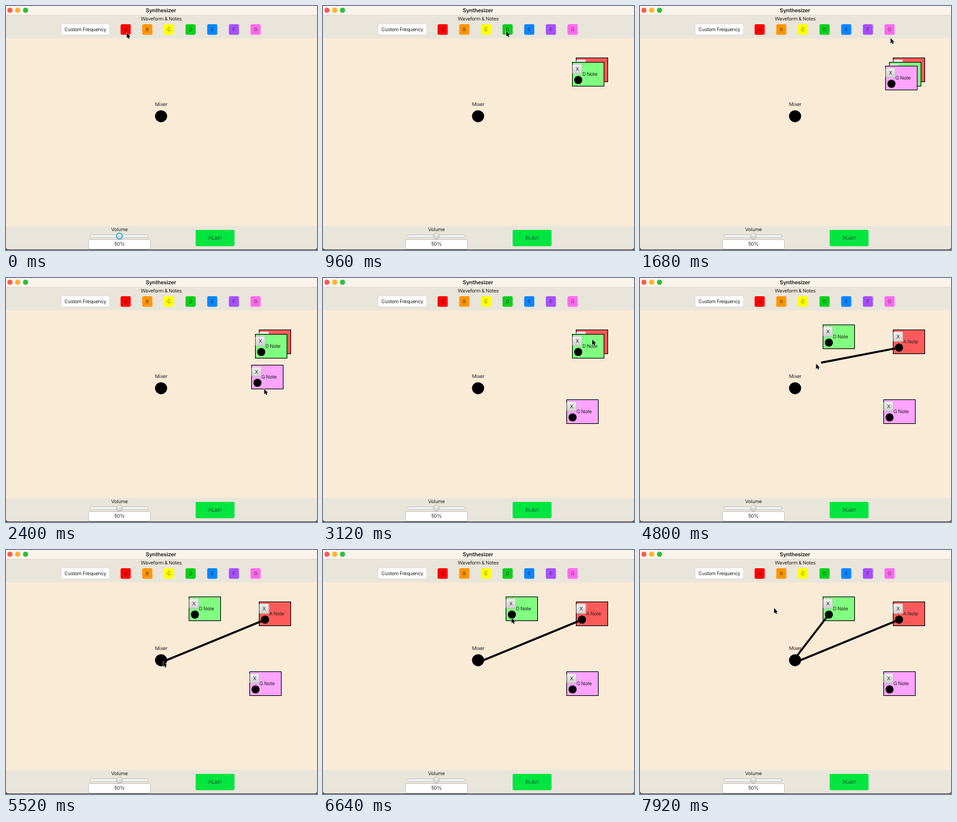
An HTML page for the animation above (8000 ms loop, 492 by 388 pixels).

```html
<!DOCTYPE html>
<html lang="en">
<head>
<meta charset="utf-8">
<title>Synthesizer</title>
<style>
  html, body { margin: 0; width: 100%; height: 100%; overflow: hidden; background: #faebd7; }
  svg { display: block; width: 100%; height: 100%; }
  text {
    font: 7.8px Inter, "Open Sans", sans-serif; letter-spacing: -.2px; word-spacing: -.4px;
    text-anchor: middle; fill: #222; text-rendering: geometricPrecision;
  }
  .title { font-weight: 700; font-size: 8.7px; letter-spacing: -.25px; fill: #35322f; }
</style>
</head>
<body>
<svg viewBox="0 0 492 388" xmlns="http://www.w3.org/2000/svg">
  <defs>
    <linearGradient id="grey" x2="0" y2="1">
      <stop offset="0" stop-color="#f1f1f1"/><stop offset="1" stop-color="#cfcfcf"/>
    </linearGradient>
  </defs>
  <rect width="492" height="388" fill="#faebd7"/>
  <rect width="492" height="15" fill="#faf4ec"/>
  <rect y="15" width="492" height="36.5" fill="#e9e5da"/>
  <rect y="14" width="492" height="1" fill="#e0dbd2"/>
  <rect y="350" width="492" height="38" fill="#e9e5da"/>
  <path d="M0 384Q.5 387 4 387H488Q491.5 387 492 384V388H0Z" fill="#4a4a48"/>
  <g id="lights"></g>
  <text class="title" x="245" y="9.5">Synthesizer</text>
  <text x="245.6" y="23.4">Waveform &amp; Notes</text>
  <rect x="88" y="29" width="75" height="17.3" rx="2" fill="#d8d4cb"/>
  <rect x="88" y="29" width="75" height="16.6" rx="2" fill="#fff"/>
  <text x="125.5" y="40">Custom Frequency</text>
  <g id="keys"></g>

  <text x="179.5" y="358.3">Volume</text>
  <rect x="132.5" y="363.8" width="92.5" height="4.4" rx="2" fill="#f4f4f4" stroke="#b5b5b2" stroke-width=".8"/>
  <circle id="thumb" cx="179.4" cy="365.9" r="4.6" fill="url(#grey)"/>
  <rect x="130.500" y="371.500" width="98" height="15" rx="1.5" fill="#fff" stroke="#bdbdb9" stroke-width=".8"/>
  <text x="179.5" y="381.2">50%</text>
  <rect x="300" y="356" width="61.500" height="26" rx="2" fill="#00e640"/>
  <text x="330.8" y="371.5" fill-opacity=".85">PLAY!</text>

  <text x="245.6" y="159">Mixer</text>
  <circle cx="245.3" cy="175.3" r="9.6"/>
  <g id="notes"></g>
  <g id="wires" stroke="#000" stroke-width="3.2"></g>
  <path id="cursor" d="M0 0V8.4L2 6.7L3.2 9.5L4.7 8.8L3.5 6.1H6Z" stroke="#fff" stroke-linejoin="round" paint-order="stroke"/>
</svg>
<script>
const LOOP = 8000, STEP = 80;
const DRAG_LAG = 60; // dragged things trail the pointer
const byId = id => document.getElementById(id);

function add(parent, tag, attrs, label) {
  const el = document.createElementNS("http://www.w3.org/2000/svg", tag);
  for (const k in attrs) el.setAttribute(k, attrs[k]);
  if (label) el.textContent = label;
  parent.append(el);
  return el;
}

// Pointer moves: start, end, x, y. It rests between them.
const moves = [
  [0, 0, 191, 42.7],
  [240, 800, 290, 40],          // D key
  [1040, 1440, 395, 42],        // G key
  [1600, 2000, 408.5, 129],     // G note
  [2080, 2400, 408.5, 176.5],
  [2400, 2720, 405, 227],
  [2800, 3120, 426, 98],        // D note
  [3200, 3600, 318.5, 88],
  [3600, 3760, 320.7, 83.5],
  [3840, 4320, 410, 111],       // A socket
  [4400, 4800, 278.5, 136.3],
  [4800, 5280, 249, 177.5],     // mixer
  [5680, 6400, 298.4, 108],     // D socket
  [6640, 7440, 247.5, 174.5],   // mixer
  [7760, 7920, 212, 92.3]
];

const ease = u => u * u * (3 - 2 * u);

function pointer(t) {
  const i = moves.findLastIndex(m => t >= m[0]);
  const [start, end, x, y] = moves[i];
  if (t >= end) return [x, y];
  const [, , px, py] = moves[i - 1];
  const k = ease((t - start) / (end - start));
  return [px + (x - px) * k, py + (y - py) * k];
}

// How far a drag from grab to drop has carried something by time t.
function dragged(t, grab, drop) {
  const [x0, y0] = pointer(grab);
  const [x, y] = pointer(Math.min(drop, Math.max(grab, t - DRAG_LAG)));
  return [x - x0, y - y0];
}

const notes = [
  { name: "A", fill: "#ff5a5a", from: 240, grab: 0, drop: 0 },
  { name: "D", fill: "#80ff80", from: 800, grab: 3200, drop: 3760 },
  { name: "G", fill: "#fda4ff", from: 1520, grab: 2080, drop: 2720 }
];

const wires = [
  { x: 410, y: 110.8, grab: 4400, drop: 5280 },
  { x: 298.6, y: 102.6, grab: 6640, drop: 7440 }
];

["#fc5b52", "#fdb427", "#27c03a"].forEach((fill, i) =>
  add(byId("lights"), "circle", { cx: 6.2 + 12.35 * i, cy: 6.7, r: 4, fill }));

const keyColors = ["#ff0000", "#ff9500", "#ffff00", "#0bd01c", "#0a86ff", "#a64fff", "#ff69ee"];
keyColors.forEach((fill, i) => {
  const x = 189.3 + i * 34.25;
  add(byId("keys"), "rect", { x: x - 8, y: 29, width: 16, height: 16.7, rx: 2, fill });
  add(byId("keys"), "text", { x, y: 39.8, "fill-opacity": .75 }, "ABCDEFG"[i]);
});

notes.forEach((n, i) => {
  n.home = [400.5 - 6 * i, 82.5 + 6.5 * i];
  n.el = add(byId("notes"), "g", {});
  add(n.el, "rect", { width: 50, height: 38, fill: n.fill, stroke: "#000" });
  add(n.el, "text", { x: 27.6, y: 21 }, n.name + " Note");
  add(n.el, "rect", { x: .3, y: 3, width: 15, height: 15.6, rx: 1.5,
    fill: "url(#grey)", stroke: "#b0b0b0", "stroke-width": .6 });
  add(n.el, "text", { x: 7.7, y: 13.4 }, "X");
  add(n.el, "circle", { cx: 9.3, cy: 28.1, r: 6.4 });
});

for (const w of wires) w.el = add(byId("wires"), "line", { x1: w.x, y1: w.y });

const place = (el, [x, y]) => el.setAttribute("transform", `translate(${x} ${y})`);
const show = (el, on) => el.setAttribute("visibility", on ? "visible" : "hidden");

function draw(t) {
  place(byId("cursor"), pointer(t));
  const focused = t < 240;
  byId("thumb").setAttribute("stroke", focused ? "#179dd0" : "#a9a9a6");
  byId("thumb").setAttribute("stroke-width", focused ? 1.5 : .8);
  for (const n of notes) {
    const shift = dragged(t, n.grab, n.drop);
    show(n.el, t >= n.from);
    place(n.el, n.home.map((h, c) => Math.floor(h + shift[c]) + .5)); // crisp borders
  }
  for (const w of wires) {
    const [dx, dy] = dragged(t, w.grab, w.drop);
    show(w.el, t > w.grab);
    w.el.setAttribute("x2", w.x + dx);
    w.el.setAttribute("y2", w.y + dy);
  }
}

const began = performance.now();
function tick() {
  const t = (performance.now() - began) % LOOP;
  draw(Math.floor(t / STEP) * STEP);
  requestAnimationFrame(tick);
}
tick();
</script>
</body>
</html>
```
